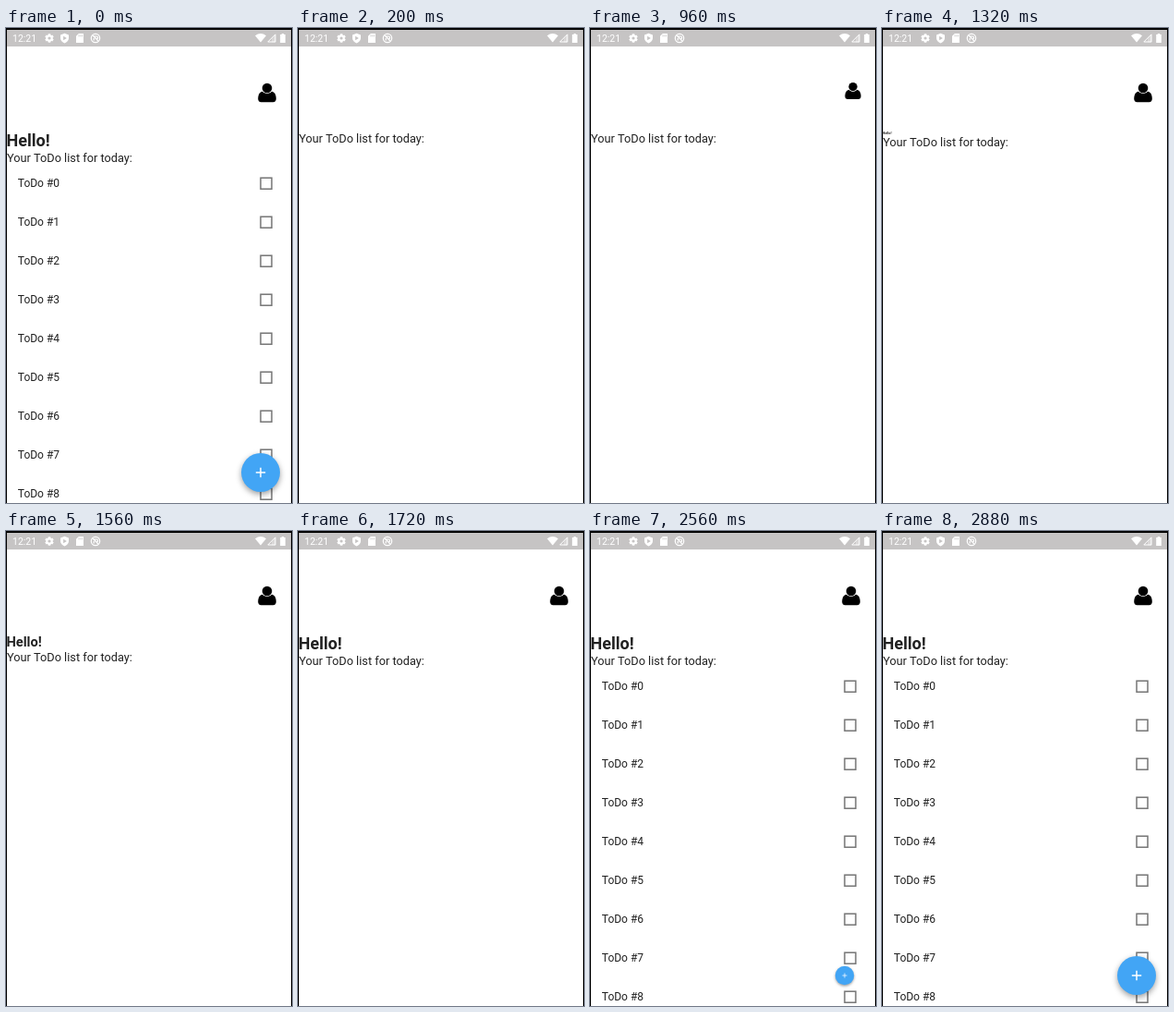
These frames come from a looping animation (310x514 px, 3280 ms). An HTML page with a canvas:

```html
<!DOCTYPE html>
<html lang="en">
<head>
<meta charset="utf-8">
<title>ToDo list intro</title>
<style>
html, body { margin: 0; width: 100%; height: 100%; overflow: hidden; background: #fff; }
canvas { display: block; }
</style>
</head>
<body>
<canvas id="stage" width="310" height="514"></canvas>
<script>
const ctx = document.getElementById('stage').getContext('2d');
const LOOP = 3280, STEP = 40, CLEAR = 80;
const INK = '#212121';

const clamp = v => Math.min(1, Math.max(0, v));

// Everything is shown until the screen restarts, then each part enters in turn.
const progress = (t, start, length = 400) => t < CLEAR ? 1 : clamp((t - start) / length);

function text(str, x, y, size, color = INK, weight = 400) {
  ctx.font = `${weight} ${size}px Roboto, sans-serif`;
  ctx.fillStyle = color;
  ctx.fillText(str, x, y);
}

function at(x, y, scale, draw) {
  ctx.save();
  ctx.translate(x, y);
  ctx.scale(scale, scale);
  draw();
  ctx.restore();
}

function disc(x, y, r, color) {
  ctx.fillStyle = color;
  ctx.beginPath();
  ctx.arc(x, y, r, 0, 7);
  ctx.fill();
}

function shape(d, color) {
  ctx.fillStyle = color;
  ctx.fill(new Path2D(d));
}

function line(d, color, width) {
  ctx.strokeStyle = color;
  ctx.lineWidth = width;
  ctx.stroke(new Path2D(d));
}

function gear() {
  for (let i = 0; i < 3; i++) {
    const a = Math.PI / 6 + i * Math.PI / 3, x = 4.7 * Math.cos(a), y = 4.7 * Math.sin(a);
    line(`M${-x} ${-y}L${x} ${y}`, '#fff', 2.6);
  }
  disc(0, 0, 3.7, '#fff');
  disc(0, 0, 1.6, '#c6c4c4');
}

function statusBar() {
  const bar = '#c6c4c4';
  ctx.fillStyle = bar;
  ctx.fillRect(1, 2, 308, 18);
  text('12:21', 7, 15, 10.5, '#fff');
  at(47, 11, 1, gear);
  at(63.5, 11, 1, () => {
    shape('M0 -5.2L4.5 -3.4V0C4.5 2.5 2.5 4.5 0 5.4C-2.5 4.5 -4.5 2.5 -4.5 0V-3.4Z', '#fff');
    shape('M-1.4 -2.3L2.4 0L-1.4 2.3Z', bar);
  });
  at(80, 11, 1, () => {
    shape('M-1.2 -5H4V5H-4V-2.2Z', '#fff');
    line('M-1 -3.6V-1.6M.8 -3.6V-1.6M2.6 -3.6V-1.6', bar, .8);
  });
  at(97, 11, 1, () => {
    line('M-4.7 0A4.7 4.7 0 1 1 4.7 0A4.7 4.7 0 1 1 -4.7 0', '#fff', 1.2);
    line('M-3 -3L3 3M-1.5 -2H1A1.6 1.6 0 0 1 1 1.2M-1.8 0V2.5', '#fff', 1.2);
  });
  shape('M270 8.2Q276 4 282 8.2L276 15.5Z', '#fff');
  line('M283.8 15L291.9 6.9V15Z', '#fff', 1);
  shape('M288 11.3L292.4 6.5V15.5H288Z', 'rgba(255,255,255,.35)');
  shape('M297.2 7H298.8V6H301.2V7H302.8V16H297.2Z', '#fff');
}

function person() {
  shape('M-5 -1.2C-8.6 -.6 -9.8 3 -9.8 6.6C-9.8 9 -8.6 10.3 -6.5 10.3H6.5' +
        'C8.6 10.3 9.8 9 9.8 6.6C9.8 3 8.6 -.6 5 -1.2Z', '#000');
  disc(0, -5, 6.1, '#fff');
  disc(0, -5, 5.3, '#000');
}

function list(alpha) {
  ctx.globalAlpha = alpha;
  for (let i = 0; i < 9; i++) {
    const y = 168 + 42 * i;
    text('ToDo #' + i, 12.8, y + 4.4, 12);
    ctx.strokeStyle = '#757575';
    ctx.lineWidth = 1.5;
    ctx.strokeRect(276, y - 5.8, 12, 12);
  }
  ctx.globalAlpha = 1;
}

function addButton(scale) {
  at(276, 481, scale, () => {
    ctx.shadowColor = 'rgba(0,0,0,.38)';
    ctx.shadowBlur = 6 * scale;
    ctx.shadowOffsetY = 2.5 * scale;
    disc(0, 0, 21, '#42a5f5');
    ctx.shadowColor = 'transparent';
    line('M-5.2 0H5.2M0 -5.2V5.2', '#fff', 1.5);
  });
}

function draw(t) {
  const icon = progress(t, 608), hello = progress(t, 1235),
        items = progress(t, 1815), add = progress(t, 2365);

  ctx.fillStyle = '#000';
  ctx.fillRect(0, 0, 310, 514);
  ctx.fillStyle = '#fff';
  ctx.fillRect(1, 2, 308, 512);
  statusBar();

  // The icon grows out of its top right corner.
  if (icon) at(300 - 17 * icon, 53 + 17 * icon, icon, person);
  if (hello) at(.5, 112 + 16.3 * hello, hello, () => text('Hello!', 0, 0, 18, INK, 700));
  text('Your ToDo list for today:', 1, 124 + 20.6 * hello, 12.75);
  if (items) list(items);
  if (add) addButton(add);
}

function frame(now) {
  const t = now % LOOP;
  draw(t - t % STEP);
  requestAnimationFrame(frame);
}
requestAnimationFrame(frame);
</script>
</body>
</html>
```
